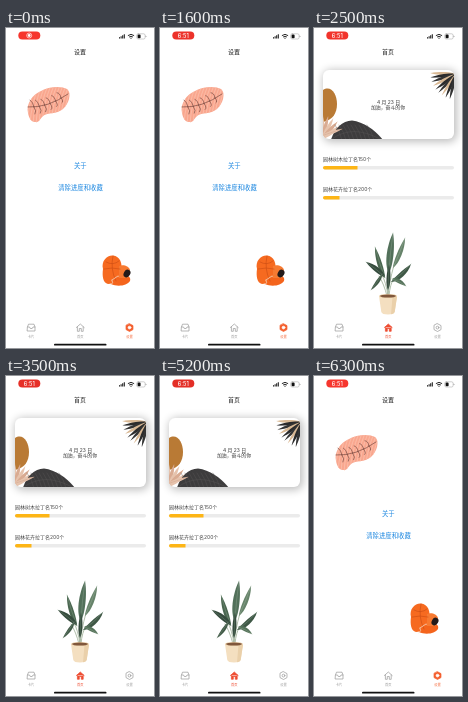
An HTML page for the animation above (6400 ms loop, 148 px wide and 320 px high).

```html
<!DOCTYPE html>
<html lang="zh-CN">
<head>
<meta charset="utf-8">
<style>
  html, body { margin: 0; width: 100%; height: 100%; overflow: hidden; background: #fff; }
  svg { display: block; width: 100%; height: 100%; font-family: Inter, "Noto Sans CJK SC", "Noto Sans CJK", sans-serif; }
  .mid { text-anchor: middle; }
  .line { fill: none; stroke-linecap: round; stroke-linejoin: round; }
</style>
</head>
<body>
<svg viewBox="0 0 148 320">
  <defs>
    <clipPath id="cardClip"><rect x="9" y="42" width="131" height="69" rx="6"/></clipPath>
    <clipPath id="peachClip"><path id="peachShape" d="M22 85C20 76 26 67 35 63C43 58 56 58 61 61C66 65 63 76 57 81C50 87 42 84 37 88C34 91 33 95 29 94C25 94 23 90 22 85Z"/></clipPath>
    <filter id="blur" x="-30%" y="-40%" width="160%" height="180%"><feGaussianBlur stdDeviation="4.5"/></filter>
  </defs>
  <rect width="148" height="320" fill="#fff"/>

  <g id="settings">
    <text class="mid" x="74" y="26" font-size="6" font-weight="500" fill="#222">设置</text>
    <use href="#peachShape" fill="#f9a78f"/>
    <g clip-path="url(#peachClip)"><path id="peachStripes" class="line" stroke="#fbc0ad" stroke-width=".8"/></g>
    <path id="peachVeins" class="line" stroke="#70433b" stroke-width=".65"/>
    <g fill="#1e88e0" class="mid">
      <text x="74.3" y="140.3" font-size="6.3">关于</text>
      <text x="74.5" y="162.3" font-size="6.4">清除进度和收藏</text>
    </g>
    <path d="M97 241C95 233 101 227 107 227.5C114 228 117 236 115 243C113 250 108 256 102 256C97 255 96 248 97 241Z" fill="#f66a20"/>
    <path d="M105 256C108 250 114 247 118 249C123 247 125 250 124 253C121 258 111 259 105 256Z" fill="#f4641c"/>
    <path d="M113 238C117 236 123 238 124 242L122 250L113 250Z" fill="#f77a31"/>
    <ellipse cx="121" cy="245.5" rx="3.2" ry="4.1" fill="#241a19" transform="rotate(30 121 245.5)"/>
    <path class="line" d="M100 234Q107 238 113 233M98 241Q106 239 114 241M107 228Q104 241 110 253" stroke="#c64a14" stroke-width=".55"/>
    <path class="line" d="M106 252Q108 255 105 257M106 252L112 248" stroke="#f4d4bd" stroke-width=".8"/>
  </g>

  <g id="home">
    <text class="mid" x="74" y="26" font-size="6" font-weight="500" fill="#222">首页</text>
    <rect x="9" y="42" width="134" height="72" rx="8" fill="#000" opacity=".25" filter="url(#blur)"/>
    <rect x="9" y="42" width="131" height="69" rx="6" fill="#fff"/>
    <g clip-path="url(#cardClip)">
      <path d="M9 62C17 57 23 66 23 76C23 85 19 92 9 94Z" fill="#b97a35"/>
      <g id="cardLeaves"></g>
    </g>
    <g class="mid" font-size="4.9" fill="#333">
      <text x="74.5" y="75.8">4 月 23 日</text>
      <text x="74" y="81.3">加油，奋斗的你</text>
    </g>
    <g font-size="5" fill="#444">
      <text x="9" y="133.4">园林树木拉丁名150个</text>
      <text x="9" y="163.4">园林花卉拉丁名200个</text>
    </g>
    <g fill="#ebebeb">
      <rect x="9" y="138" width="131" height="3.6" rx="1.8"/>
      <rect x="9" y="168" width="131" height="3.6" rx="1.8"/>
    </g>
    <g fill="#fdb515">
      <path d="M10.8 138H43.5V141.6H10.8A1.8 1.8 0 0 1 10.8 138Z"/>
      <path d="M10.8 168H25.5V171.6H10.8A1.8 1.8 0 0 1 10.8 168Z"/>
    </g>
    <g id="plant"></g>
    <path d="M65 268L67.3 284Q68 286.5 74 286.5Q80 286.5 80.7 284L83 268Z" fill="#f4dfc0"/>
    <path d="M78.5 269H83L80.7 284Q80 286 77 286.3Z" fill="#ead0aa"/>
    <ellipse cx="74" cy="268" rx="9" ry="2" fill="#ead0aa"/>
    <ellipse cx="74" cy="268.1" rx="8" ry="1.5" fill="#80573c"/>
  </g>

  <g class="line" stroke="#999" stroke-width=".7">
    <path d="M21.5 299L22.5 296.2H28L29 299V303H21.5ZM21.5 299H23.5L24.3 300.5H26.2L27 299H29"/>
    <path id="houseIcon" d="M70.4 299.5L74.3 296L78.2 299.5M71.4 299V303.3H73.3V300.5H75.3V303.3H77.2V299"/>
    <path id="gearIcon" d="M123.5 295.7L127 297.6V301.6L123.5 303.5L120 301.6V297.6Z"/>
    <circle id="gearHole" cx="123.5" cy="299.6" r="1.4"/>
  </g>
  <g class="mid" font-size="3.3" fill="#999">
    <text x="25" y="309.8">卡片</text>
    <text id="homeLabel" x="74.3" y="309.8">首页</text>
    <text id="settingsLabel" x="123.5" y="309.8">设置</text>
  </g>
  <rect x="48" y="315.8" width="52.5" height="1.7" rx=".85" fill="#111"/>

  <rect id="pill" x="12.3" y="3.5" width="22" height="8" rx="4"/>
  <g id="recordMark"><circle cx="23.2" cy="7.5" r="2.5" fill="none" stroke="#fff" stroke-width=".65"/><circle cx="23.2" cy="7.5" r="1.4" fill="#fff"/></g>
  <text id="clock" class="mid" x="23.3" y="9.5" font-size="5.6" font-weight="500" fill="#fff">6:51</text>
  <g fill="#111">
    <path d="M113 9.2h1v1.3h-1zM114.6 8.3h1v2.2h-1zM116.2 7.3h1v3.2h-1zM117.8 6.2h1v4.3h-1z"/>
    <rect x="131.6" y="6.6" width="3" height="3.6" rx=".8"/>
    <path d="M139.8 7.5q1 .9 0 1.8z"/>
  </g>
  <g class="line" stroke="#111">
    <path d="M122.2 7.4Q125 5 127.8 7.4M123.4 8.8Q125 7.4 126.6 8.8" stroke-width=".9"/>
    <path d="M125 10.1V10.2" stroke-width="1.1"/>
    <rect x="130.7" y="5.8" width="8.4" height="5.2" rx="1.5" stroke-width=".4" stroke="#888"/>
  </g>
</svg>
<script>
const $ = id => document.getElementById(id);

// A curved leaf running from base to tip, with a pale midrib.
function leaf(x, y, tipX, tipY, width, color, rib, bend = 0) {
  const dx = tipX - x, dy = tipY - y, length = Math.hypot(dx, dy);
  const at = (along, side) =>
    `${x + dx * along - dy / length * side} ${y + dy * along + dx / length * side}`;
  return `<path d="M${x} ${y}C${at(.2, bend + width)} ${at(.7, bend + width)} ${tipX} ${tipY}` +
    `C${at(.65, bend - width)} ${at(.15, bend - width)} ${x} ${y}" fill="${color}"/>` +
    `<path class="line" d="M${x} ${y}Q${at(.5, bend)} ${tipX} ${tipY}" stroke="${rib}" stroke-width=".4"/>`;
}

// Leaves spreading from one point between two angles in degrees.
function fan(x, y, from, to, count, radius, width, colors) {
  let shapes = "";
  for (let i = 0; i < count; i++) {
    const a = (from + (to - from) * i / (count - 1)) * Math.PI / 180;
    const color = colors[i % colors.length];
    shapes += leaf(x, y, x + Math.cos(a) * radius, y + Math.sin(a) * radius, width, color, color);
  }
  return shapes;
}

function moundRibs() {
  let d = "";
  for (let x = 28; x < 62; x += 4) d += `M${x} 112Q${x - 2} 104 ${x - 7} 97`;
  return d;
}

$("cardLeaves").innerHTML =
  fan(8, 111, -88, -35, 5, 23, 2.6, ["#e6c3ad", "#d9ab92"]) +
  `<path id="mound" d="M17 112C20 101 28 93 38 92.5C50 94 61 102 69 112Z" fill="#3d3c3d"/>` +
  `<path class="line" d="${moundRibs()}M18 111Q38 96 66 111" stroke="#5c5a5a" stroke-width=".4"/>` +
  leaf(7, 108, 28, 101, 2, "#e6c3ad", "#c99d85") +
  fan(142, 46, 182, 104, 9, 25, 2, ["#d8b894", "#2b2b2c", "#343434"]);

$("plant").innerHTML =
  `<path class="line" d="M74 268Q73 252 75 240M74 268Q72 254 68 247M73 268Q70 256 65 248M74 268Q75 255 80 237M75 268Q76 256 80 250" stroke="#a9b8a2" stroke-width=".9"/>` +
  leaf(75, 245, 79, 205, 4.5, "#52705a", "#93aa96", -1) +
  leaf(79, 240, 91, 210, 3.2, "#66836a", "#a2b6a1", 1) +
  leaf(71, 250, 61, 219, 3.2, "#4a6650", "#91aa92", -1) +
  leaf(71, 249, 52, 234, 3.4, "#364c3e", "#7b947f", 1) +
  leaf(68, 246, 57, 262, 2.3, "#3f5846", "#88a08a", -1) +
  leaf(77, 254, 97, 236, 3.2, "#3f5846", "#89a38e", 2) +
  leaf(78, 251, 92, 258, 2.6, "#56735b", "#92aa93", -1.5) +
  leaf(74, 262, 75, 236, 2.6, "#33493b", "#738b76");

let stripes = "";
for (let x = 18; x < 72; x += 3) stripes += `M${x} 96Q${x + 1} 77 ${x + 9} 57`;
$("peachStripes").setAttribute("d", stripes);
let veins = "M22 79Q42 80 62 66";
for (let i = 0; i < 6; i++) {
  const x = 28 + i * 5.4, y = 79 - i * i * .37;
  veins += `M${x} ${y}Q${x - 1} ${y - 5} ${x - 4} ${y - 7 + i * .4}`;
  veins += `M${x} ${y}Q${x + 3} ${y + 4} ${x + 1} ${y + 7 - i * .4}`;
}
$("peachVeins").setAttribute("d", veins);

const LOOP = 6400, HOME_FROM = 1700, HOME_TO = 5300;
const show = (id, visible) => $(id).style.display = visible ? "" : "none";
const paint = (id, fill, stroke) => Object.assign($(id).style, { fill, stroke });

function draw(now) {
  const t = now % LOOP;
  const home = t >= HOME_FROM && t < HOME_TO;
  show("home", home);
  show("settings", !home);
  paint("houseIcon", home ? "#ee4d32" : "none", home ? "#ee4d32" : "#999");
  paint("gearIcon", home ? "none" : "#f4602f", home ? "#999" : "#f4602f");
  paint("gearHole", home ? "none" : "#fff", home ? "#999" : "#fff");
  $("homeLabel").style.fill = home ? "#ee4d32" : "#999";
  $("settingsLabel").style.fill = home ? "#999" : "#f4602f";

  const pulse = .5 + .5 * Math.cos(t / LOOP * Math.PI * 6);
  $("pill").style.fill = `rgb(${226 + 20 * pulse},${46 + 8 * pulse},${38 + 8 * pulse})`;
  const reveal = Math.min(1, Math.max(0, (t - 400) / 300));
  $("recordMark").style.opacity = 1 - reveal;
  $("clock").style.opacity = reveal;
  requestAnimationFrame(() => draw(performance.now()));
}
draw(performance.now());
</script>
</body>
</html>
```
